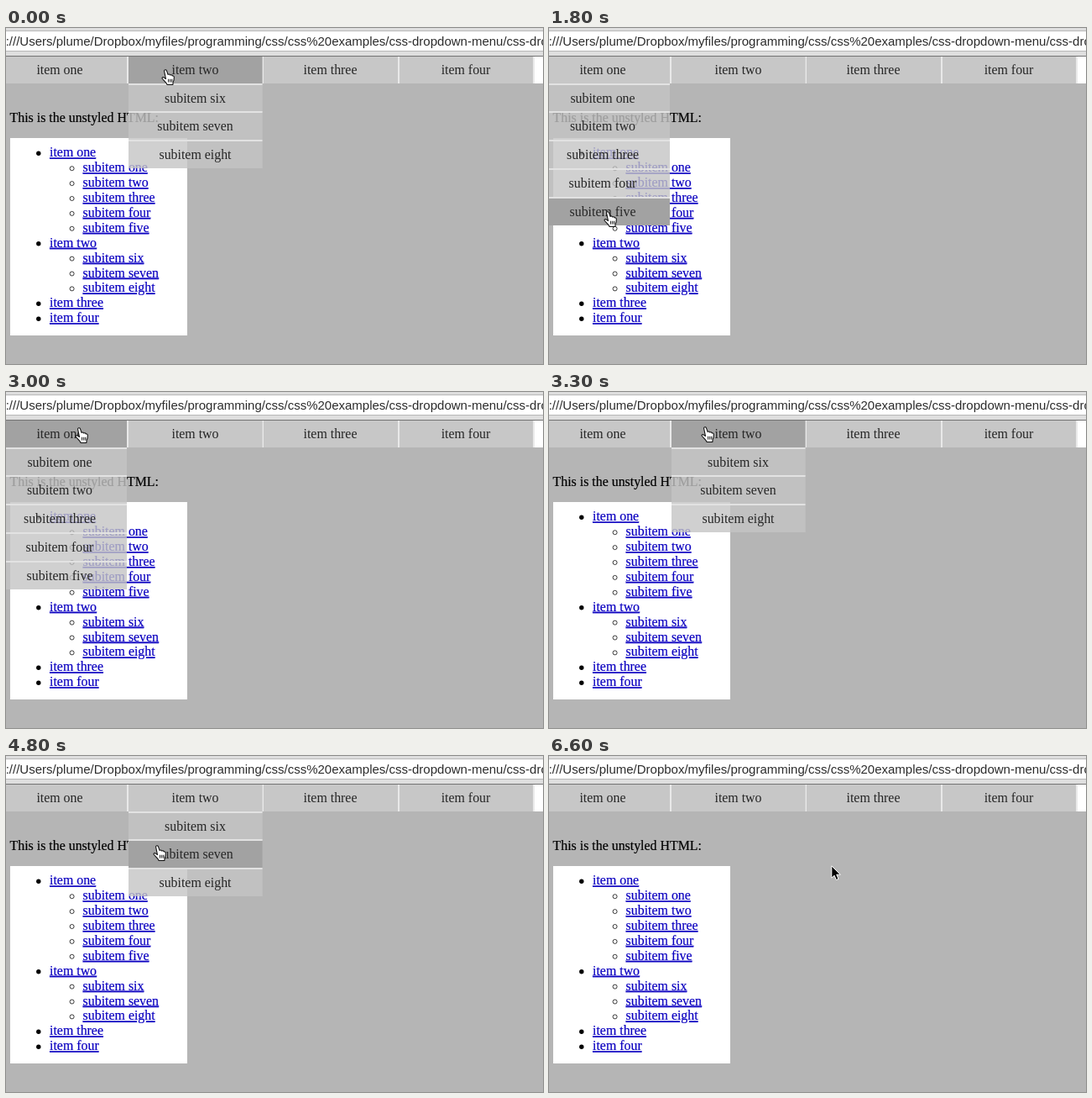
Write an HTML page that moves like this. It is 640x400 px and loops after 6.9 s.

```html
<!DOCTYPE html>
<html lang="en">
<head>
<meta charset="utf-8">
<title>Dropdown menu</title>
<style>
html, body { margin: 0; width: 100%; height: 100%; overflow: hidden; background: #b5b5b5; }
svg { display: block; }
text { font: 15.9px "Liberation Serif", Times, serif; fill: #000; stroke: #000; stroke-width: .2; }
.url { font: 15px "Liberation Sans", Arial, sans-serif; fill: #2c2c2c; stroke: none; }
.link { fill: #0b00c0; stroke: #0b00c0; text-decoration: underline; }
.label { fill: #262626; stroke: none; text-anchor: middle; }
</style>
</head>
<body>
<svg width="640" height="400" viewBox="0 0 640 400">
  <g id="page"></g>
  <g id="menu"></g>
  <g id="cursor"></g>
</svg>
<script>
const STEP = 300, LOOP = 6900, ROW = 33.7, TOP = 34;

const items = [
  { name: 'item one', left: 0, right: 144, mid: 64,
    subs: ['one', 'two', 'three', 'four', 'five'] },
  { name: 'item two', left: 146, right: 305.6, mid: 225.5,
    subs: ['six', 'seven', 'eight'] },
  { name: 'item three', left: 307, right: 467, mid: 386.5, subs: [] },
  { name: 'item four', left: 469, right: 628, mid: 548, subs: [] }
];

// Pointer position in each step; the last one is outside the menu.
const path = [
  [185, 49], [94, 50], [94, 50], [73, 48], [70, 108], [68, 172], [65, 218], [68, 150],
  [68, 103], [70, 44], [82, 42], [181, 41], [182, 47], [180, 76], [178, 112], [176, 145],
  [175, 106], [180, 44], [181, 84], [182, 46], [180, 80], [179, 140], [336, 130]
];

const hand = `<g transform="scale(1.12 1.03)"><path fill="#fff" stroke="#111" stroke-linejoin="round"
  d="M3.2 2.2C3 .6 5.2 .2 5.8 1.8L7.2 6.2C8 5.5 9.2 5.8 9.5 6.8 10.4 6.2 11.5 6.6 11.7 7.7
  12.8 7.3 13.6 8 13.7 9.2 13.8 11.5 13.6 13 12.6 15L12.4 18H6.4C5.5 15.5 3.5 14 1.2 11.2
  .4 10 1.6 8.9 2.8 9.6L4.9 11.2Z"/>
  <path fill="none" stroke="#111" stroke-width=".9" d="M7.7 11.5v3.5M9.6 11.5v3.5M11.4 11.5v3.5"/></g>`;
const arrow = `<path fill="#000" stroke="#fff" d="M.8 .8v14.4l3.3-3 2.3 5.3 2.6-1.1-2.3-5.2h4.6z"/>`;

const rect = (x, y, w, h, fill, opacity = 1) =>
  `<rect x="${x}" y="${y}" width="${w}" height="${h}" fill="${fill}" opacity="${opacity}"/>`;
const text = (x, y, cls, str) => `<text x="${x}" y="${y}" class="${cls}">${str}</text>`;
const put = (id, markup) => document.getElementById(id).innerHTML = markup;

function page() {
  let out = rect(0, 0, 640, 33, '#dedede') + rect(0, 3, 640, 25, '#b8b8b8') +
    rect(0, 4, 640, 23, '#fff') + rect(0, 33, 640, 1, '#747474') +
    text(-.3, 21, 'url', ':///Users/plume/Dropbox/myfiles/programming/css/css%20examples/css-dropdown-menu/css-dropdown') +
    text(4.5, 112, '', 'This is the unstyled HTML:') +
    rect(5, 131, 211, 235, '#fff');
  let y = 153.3;
  for (const { name, subs } of items) {
    out += `<circle cx="38.8" cy="${y - 4}" r="2.7"/>` + text(52, y, 'link', name);
    y += 17.9;
    for (const sub of subs) {
      out += `<circle cx="78.6" cy="${y - 4}" r="2.5" fill="none" stroke="#222" stroke-width=".9"/>` +
        text(91.6, y, 'link', 'subitem ' + sub);
      y += 17.9;
    }
  }
  return out;
}

function menu(open, row) {
  let out = rect(0, TOP, 640, 32, '#e9e9e9') + rect(630, TOP, 10, 32, '#fff');
  items.forEach(({ name, left, right, mid, subs }, i) => {
    const active = i === open, width = right - left;
    out += rect(left, TOP, width, 32, active && row === 0 ? '#a2a2a2' : '#c7c7c7') +
      text(mid, TOP + 21, 'label', name);
    if (!active) return;
    subs.forEach((sub, k) => {
      const y = Math.round(TOP + ROW * (k + 1)), hover = row === k + 1;
      out += rect(left, y - 2, width, 2, '#e2e2e2') +
        rect(left, y, width, 32, hover ? '#a2a2a2' : '#c5c5c5', hover ? 1 : .8) +
        text(mid, y + 21, 'label', 'subitem ' + sub);
    });
  });
  return out;
}

function show(step) {
  const [x, y] = path[step], outside = x > 310;
  const open = outside ? -1 : x < 143 ? 0 : 1;
  put('menu', menu(open, Math.floor((y - TOP) / ROW)));
  put('cursor', `<g transform="translate(${x} ${y})">${outside ? arrow : hand}</g>`);
}

let shown = -1;
function tick() {
  const step = Math.floor(performance.now() % LOOP / STEP);
  if (step !== shown) show(shown = step);
  requestAnimationFrame(tick);
}

put('page', page());
tick();
</script>
</body>
</html>
```
